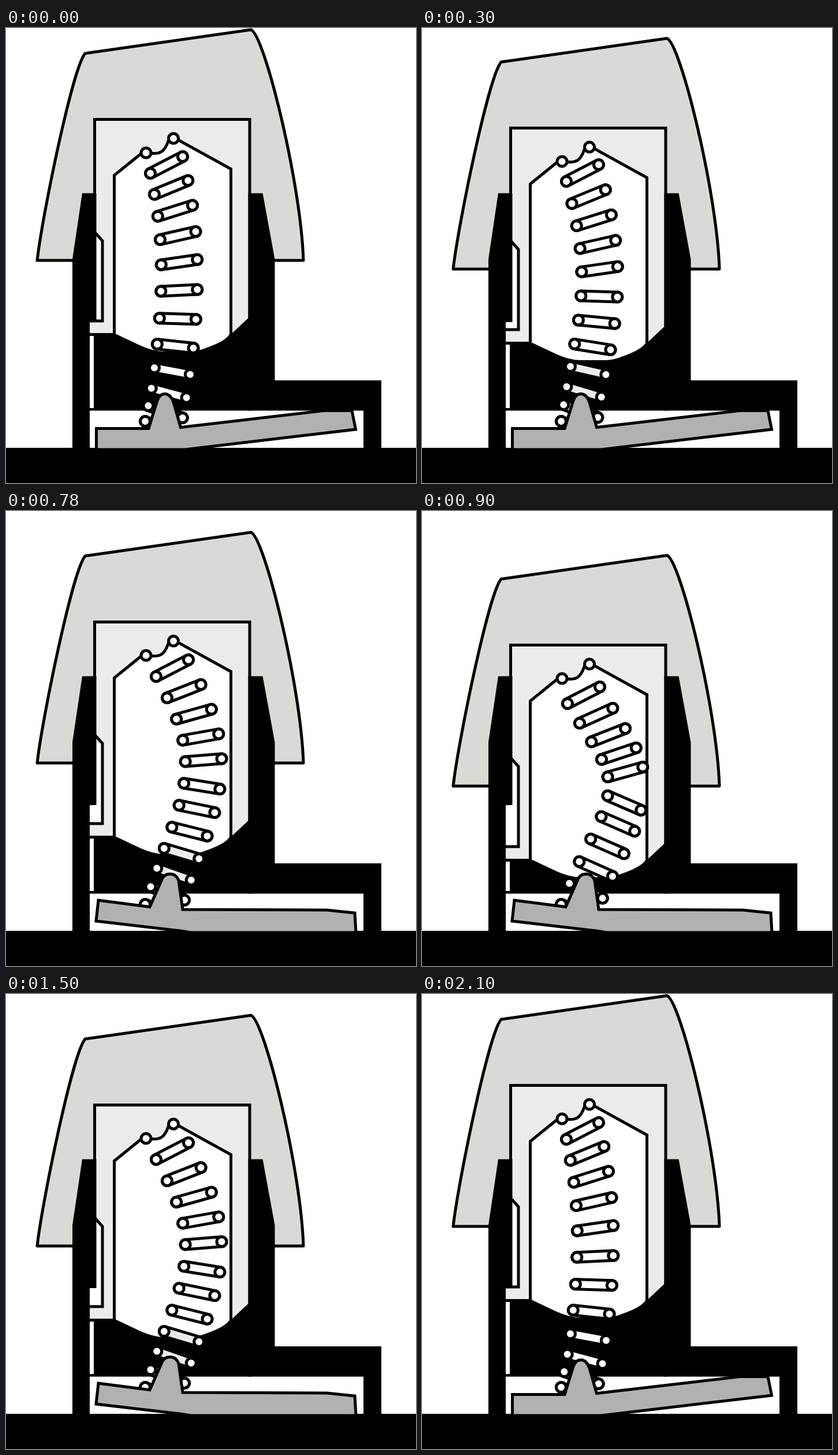
An HTML page that plays this animation: 710 by 789 pixels, repeating every 2400 ms.

```html
<!DOCTYPE html>
<html lang="en">
<head>
<meta charset="utf-8">
<title>Buckling spring key switch</title>
<style>
  html, body { margin: 0; width: 100%; height: 100%; overflow: hidden; background: #fff; }
  svg { display: block; width: 710px; height: 789px; }
  .line { stroke: #000; stroke-width: 5; }
  .cap { fill: #dad9d5; }
  .stem { fill: #ebebe9; }
  .white { fill: #fff; }
  .lever { fill: #b1b1b1; }
  .bar { stroke-linecap: round; stroke-width: 12; }
  .rim { stroke-width: 22; }

  .key, .pose { animation: 2.4s step-end infinite; }
  .pose { visibility: hidden; }
  .key { animation-name: press; }
  .p0 { animation-name: rest; }
  .p1 { animation-name: touch; }
  .p2 { animation-name: bend; }
  .p3 { animation-name: bottom; }
  .up { animation-name: up; }
  .down { animation-name: down; }

  @keyframes press {
    0%, 87.5%, 100% { transform: translateY(0); }
    12.5%, 75% { transform: translateY(15px); }
    25%, 62.5% { transform: translateY(34px); }
    37.5% { transform: translateY(74px); }
  }
  @keyframes rest { 0%, 87.5%, 100% { visibility: visible; } 12.5% { visibility: hidden; } }
  @keyframes touch { 0%, 25%, 87.5%, 100% { visibility: hidden; } 12.5%, 75% { visibility: visible; } }
  @keyframes bend { 0%, 37.5%, 75%, 100% { visibility: hidden; } 25%, 62.5% { visibility: visible; } }
  @keyframes bottom { 0%, 62.5%, 100% { visibility: hidden; } 37.5% { visibility: visible; } }
  @keyframes up { 0%, 75%, 100% { visibility: visible; } 25% { visibility: hidden; } }
  @keyframes down { 0%, 75%, 100% { visibility: hidden; } 25% { visibility: visible; } }
</style>
</head>
<body>
<svg viewBox="0 0 710 789">
  <path d="M152 500H425V663.500H140V659H152Z"/>

  <g class="key">
    <path class="line cap" stroke-linejoin="round" d="M54 403C62 330 115 70 137 44L424 3C447 9 511 270 515 403Z"/>
    <path class="white" d="M140 354H167V508H140Z"/>
    <path class="line stem" d="M153.500 158.500H422V504L389 535V531.500H140V508H167V369L153.500 354Z"/>
    <path class="line white" d="M187.500 532V255.500L235 217L242 216C268 221 275 214 281 196L290 189.500L389.500 244.500V532C384 541 373 548 350 556Q332 563.500 318 563.500H275Q255 563.500 232 553Z"/>
    <circle class="line white" cx="242.500" cy="216.500" r="8.500"/>
    <circle class="line white" cx="290" cy="191.500" r="8.500"/>
  </g>

  <path d="M132 286.500H156.500V510H145V730H115V401Z"/>
  <path d="M419.500 286.500H444.500L465.500 401V611H650V730H619V663.500H419.500Z"/>
  <path d="M0 728H710V789H0Z"/>

  <g id="springs"></g>

  <path class="line lever pose up" d="M156.500 731V694.500H247L261 649Q265 634.500 275 634.500T290 649L302.500 692.500L550 663.500H599L605.500 696L310 731Z"/>
  <path class="line lever pose down" d="M160 675L249 686.500L269 641Q273 629.500 284 629.500T299 641L306 691L556 692L604 697L606 731H320L305 728.500L156 711Z"/>
</svg>
<script>
  const LENGTH = 63;
  const BEND = 4;
  const FOOT = { x: 241, y: 682 };
  const TILT = { top: -29, foot: 26 };

  // wx, wy: sine harmonics bowing the spring; tilt: coil rise just above and below the bend.
  const poses = [
    { last: 11, x: 250, y: 252, wx: [21.8, 3, 0], wy: [14, -13.5, 1], tilt: [-9, -3], lowFill: '#fff' },
    { last: 11, x: 250, y: 266, wx: [27, 6.4, -1], wy: [13, -7.8, 1.5], tilt: [-9, 2], lowFill: '#ebebe9' },
    { last: 11, x: 260, y: 287, wx: [53, 12, -1], wy: [8, -4, 1.3], tilt: [-5, 10], lowFill: '#ebebe9' },
    { last: 10, x: 252, y: 334, wx: [70, 7.6, -5], wy: [-11.3, 0.6, 2.9], tilt: [-17, 25], lowFill: '#fff' }
  ];

  const lerp = (a, b, t) => a + (b - a) * t;
  const wave = (amps, u) => amps.reduce((sum, a, k) => sum + a * Math.sin((k + 1) * Math.PI * u), 0);
  const ring = (x, y) => `<circle class="line white" cx="${x}" cy="${y}" r="8.5"/>`;

  function rise({ tilt: [above, below], last }, n) {
    return n <= BEND
      ? lerp(TILT.top, above, n / BEND)
      : lerp(below, TILT.foot, (n - BEND - 1) / (last - BEND - 1));
  }

  function coil(pose, n) {
    const u = n / pose.last;
    const x = lerp(pose.x, FOOT.x, u) + wave(pose.wx, u);
    const y = lerp(pose.y, FOOT.y, u) + wave(pose.wy, u);
    const dy = rise(pose, n);
    const x2 = x + Math.sqrt(LENGTH ** 2 - dy ** 2);
    const y2 = y + dy;
    const bar = (color, name = '') => `<path class="bar ${name}" stroke="${color}" d="M${x} ${y}L${x2} ${y2}"/>`;
    return bar('#000', 'rim') + bar(n > 7 ? pose.lowFill : '#fff') + ring(x, y) + ring(x2, y2);
  }

  function spring(pose, i) {
    let coils = '';
    for (let n = pose.last; n >= 0; n--) coils += coil(pose, n);
    return `<g class="pose p${i}">${coils}</g>`;
  }

  document.getElementById('springs').innerHTML = poses.map(spring).join('');
</script>
</body>
</html>
```
